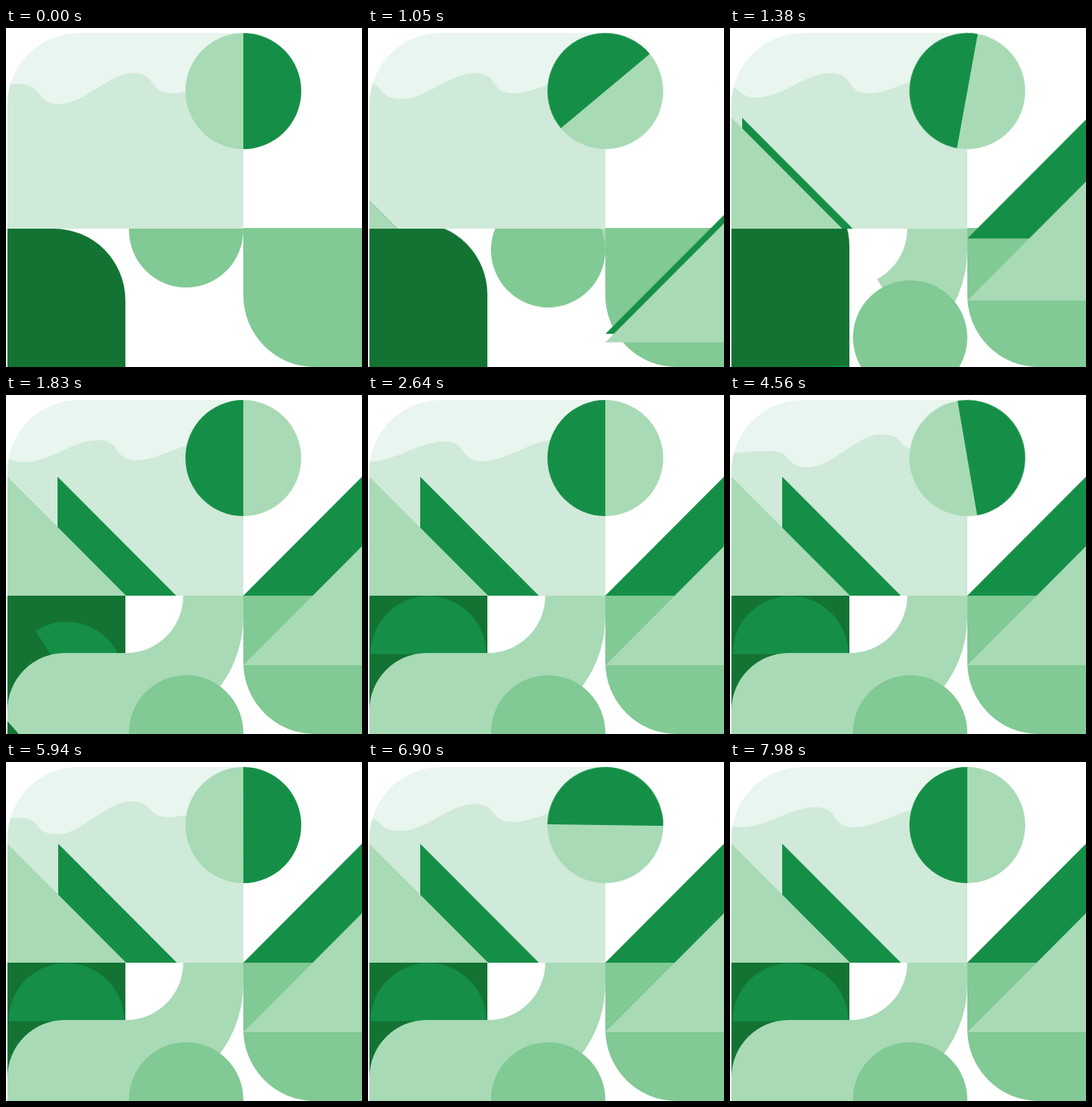
Write an HTML page without scripts that moves like this. It is 498x473 px and loops after 8000 ms.

```html
<!DOCTYPE html>
<html lang="en">
<head>
<meta charset="utf-8">
<title>Green shapes</title>
<style>
  html, body { margin: 0; width: 100%; height: 100%; overflow: hidden; background: #fff; }
  svg { display: block; width: 100%; height: 100%; }

  .mist { fill: #e9f5ef; }
  .haze { fill: #cfead8; }
  .light { fill: #a8dab5; }
  .mid { fill: #81c995; }
  .deep { fill: #158f47; }
  .dark { fill: #137333; }

  .move { animation: 8s cubic-bezier(.65, 0, .35, 1) infinite; }
  .drift { animation-name: drift; animation-timing-function: linear; }
  .swell { animation-name: swell; animation-timing-function: linear; }
  .spin { animation-name: spin; }
  .rise { animation-name: rise; }
  .slide { animation-name: slide; }
  .lift { animation-name: lift; }
  .drop { animation-name: drop; }
  .roll { animation-name: roll; }
  .draw { animation-name: draw; stroke-dasharray: 1 2; }
  .climb-light { animation-name: climb-light; }
  .climb-deep { animation-name: climb-deep; }

  @keyframes drift { to { transform: translateX(-216px); } }

  /* Crests and troughs change height while the wave drifts left. */
  @keyframes swell {
    0% { d: path("M-82 100S-16 78 18 78 41 106 75 106 144 63 178 63 198 91 232 91 301 63 335 63 355 91 389 91 458 63 492 63H560V300H-82Z"); }
    22.9% { d: path("M-82 100S-16 72 18 72 41 94 75 94 144 63 178 63 198 91 232 91 301 63 335 63 355 91 389 91 458 63 492 63H560V300H-82Z"); animation-timing-function: ease-in; }
    57%, 74.25% { d: path("M-82 100S-16 78 18 78 41 84 75 84 144 78 178 78 198 101 232 101 301 55 335 55 355 77 389 77 458 55 492 55H560V300H-82Z"); }
    99.75%, 100% { d: path("M-82 100S-16 78 18 78 41 91 75 91 144 77 178 77 198 91 232 91 301 63 335 63 355 91 389 91 458 63 492 63H560V300H-82Z"); }
  }

  @keyframes spin {
    0%, 62.5%, 73.8% { transform: rotate(0deg); }
    22.4%, 37.95%, 98.8%, 100% { transform: rotate(-180deg); }
  }
  @keyframes rise {
    0%, 8.75% { transform: translateY(166px); }
    20%, 100% { transform: none; }
  }
  @keyframes slide {
    0%, 13.1% { transform: none; }
    24.2%, 100% { transform: translateX(71px); }
  }
  @keyframes lift {
    0%, 9.75% { transform: none; }
    22.9%, 100% { transform: translateY(-110px); }
  }
  @keyframes drop {
    0%, 8.5% { transform: none; }
    22.5%, 100% { transform: translateY(189px); }
  }
  @keyframes roll {
    0%, 16.25% { transform: translateY(112px) rotate(180deg); }
    27.95%, 100% { transform: translateY(0) rotate(0deg); }
  }
  @keyframes draw {
    0%, 7.3% { stroke-dashoffset: 1; }
    30.6%, 100% { stroke-dashoffset: 0; }
  }
  @keyframes climb-light {
    0%, 4% { transform: translateY(262px); }
    19%, 100% { transform: none; }
  }
  @keyframes climb-deep {
    0%, 5.15% { transform: translateY(359px); }
    20.15%, 100% { transform: none; }
  }
</style>
</head>
<body>
<svg viewBox="0 0 498 473">
  <defs>
    <clipPath id="panel"><path d="M2 280V107A100 100 0 0 1 102 7H332V280Z"/></clipPath>
    <clipPath id="low"><path d="M0 280H498V473H0Z"/></clipPath>
    <mask id="reveal" maskUnits="userSpaceOnUse" x="0" y="270" width="498" height="203">
      <path class="move draw" pathLength="1" fill="none" stroke="#fff" stroke-width="200"
            d="M290 270V300A122 116 0 0 1 168 416H40A82 82 0 0 0 -42 498"/>
    </mask>
  </defs>

  <!-- Panel with wave and triangles -->
  <g clip-path="url(#panel)">
    <path class="mist" d="M0 0H332V280H0Z"/>
    <g class="move drift">
      <path class="haze move swell" d="M-82 100H560V300H-82Z"/>
    </g>
    <g class="move rise">
      <path class="deep move slide" d="M2 114L168 280H2Z"/>
      <path class="light" d="M2 114L168 280H2Z"/>
    </g>
  </g>

  <!-- Two-tone disc -->
  <g transform="translate(332 88)">
    <g class="move spin">
      <circle class="light" r="81"/>
      <path class="deep" d="M0 -81A81 81 0 0 1 0 81Z"/>
    </g>
  </g>

  <!-- Lower left block -->
  <g clip-path="url(#low)">
    <path class="dark move lift" d="M2 280H67A100 100 0 0 1 167 380V600H2Z"/>
    <g transform="translate(84.5 361.5)">
      <path class="deep move roll" d="M-81 0A81 81 0 0 1 81 0Z"/>
    </g>
  </g>

  <!-- Ribbon and half disc -->
  <g mask="url(#reveal)">
    <path class="light" d="M248 280H332V309A164 164 0 0 1 168 473H2V440A80 80 0 0 1 82 360H168A80 80 0 0 0 248 280Z"/>
  </g>
  <g clip-path="url(#low)">
    <circle class="mid move drop" cx="252" cy="282" r="80"/>
  </g>

  <!-- Lower right block -->
  <path class="mid" d="M332 279H498V473H432A100 100 0 0 1 332 373Z"/>
  <path class="deep move climb-deep" d="M498 114V280H332Z"/>
  <path class="light move climb-light" d="M498 211V377H332Z"/>
</svg>
</body>
</html>
```
